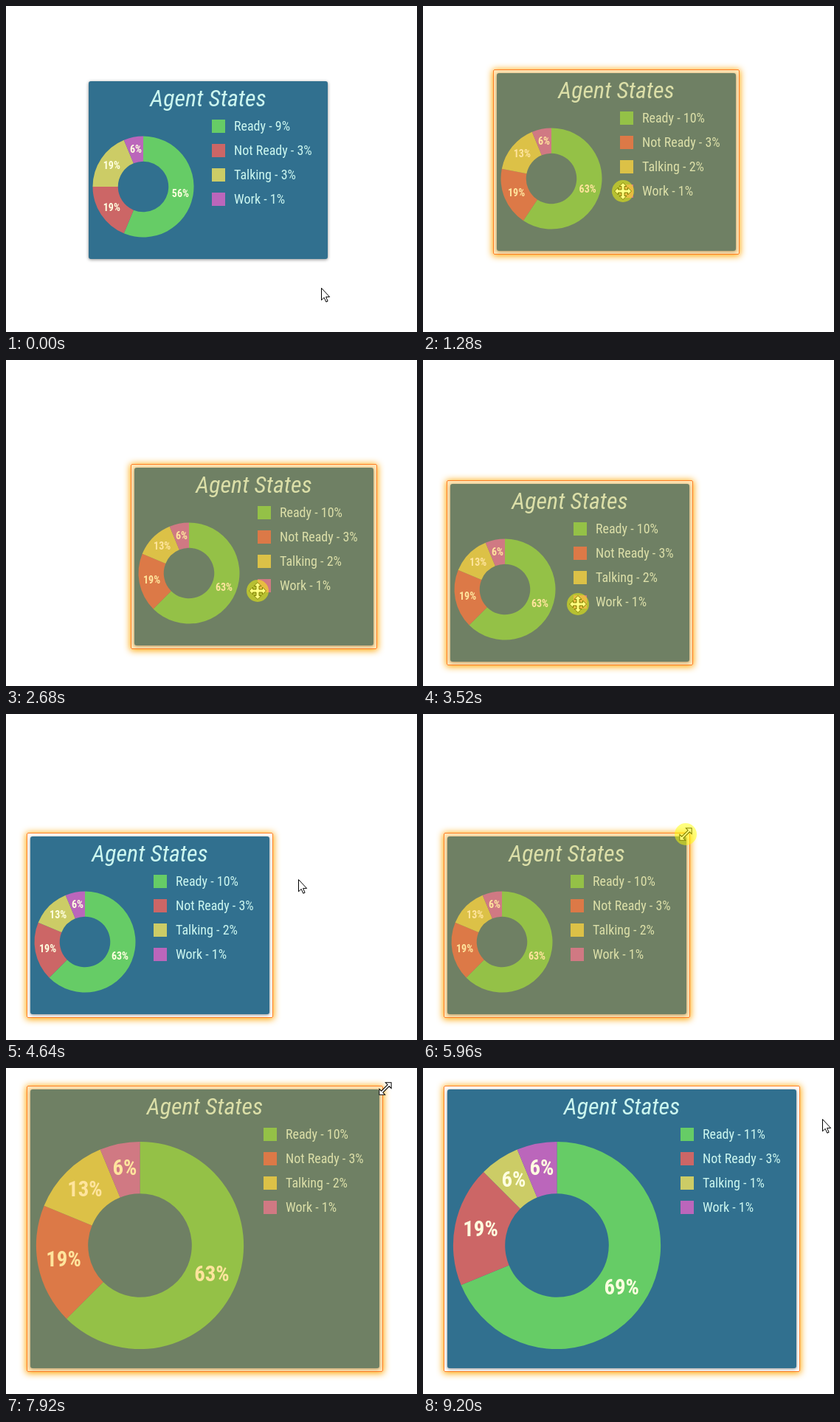
Write an HTML page that moves like this. It is 557 px wide and 442 px high and loops after 9.28 s.

```html
<!DOCTYPE html>
<html lang="en">
<head>
<meta charset="utf-8">
<title>Agent States</title>
<style>
  html, body { margin: 0; width: 100%; height: 100%; overflow: hidden; background: #fff; }
  #stage { position: relative; width: 557px; height: 442px; overflow: hidden; }
  #widget, #frame, #card, #tint, svg { position: absolute; }
  #frame {
    inset: -5px; box-sizing: border-box; border: 1px solid #ff7f27;
    border-radius: 2px; box-shadow: 0 1px 10px 1px orange;
  }
  #card { inset: 0; background: #31708f; border-radius: 3px; box-shadow: 0 1px 4px rgba(0, 0, 0, .45); }
  #tint { inset: -4px; background: rgba(255, 165, 0, .3); }
  svg { left: 0; top: 0; width: 557px; height: 442px; overflow: visible; }
  text {
    font-family: "Roboto Condensed", Roboto, sans-serif; font-stretch: condensed;
    font-size: 18px; fill: #ccf7f0;
  }
  .title { font-size: 32px; font-style: italic; text-anchor: middle; }
  .share { font-weight: 600; fill: lightyellow; text-anchor: middle; }
  #pointer path { fill: #fff; stroke: #000; stroke-width: 1; }
</style>
</head>
<body>
<div id="stage">
  <div id="widget">
    <div id="frame"></div>
    <div id="card"></div>
    <svg id="chart"></svg>
    <div id="tint"></div>
  </div>
  <svg>
    <g id="pointer">
      <path id="arrow" d="M.5 .5V16.8L4.2 13.3 6.8 19.2 9.1 18.2 6.6 12.4H11.6Z"/>
      <path id="move" d="M0-11.5L5-6.5H2V-2H6.5V-5L11.5 0 6.5 5V2H2V6.5H5L0 11.5-5 6.5H-2V2H-6.5V5L-11.5 0-6.5-5V-2H-2V-6.5H-5Z"/>
      <path id="resize" transform="rotate(-45)" d="M-11.5 0L-6-5.5V-1.5H6V-5.5L11.5 0 6 5.5V1.5H-6V5.5Z"/>
      <circle id="press" r="15" fill="#ff0" fill-opacity=".5"/>
    </g>
  </svg>
</div>
<script>
const LOOP = 9280, START = 160, TICK = 280 / 3;

const states = [
  ['Ready', '#66cc66'], ['Not Ready', '#cc6666'],
  ['Talking', '#cccc66'], ['Work', '#bb66bb']
];
const counts = [[9, 3, 3, 1], [10, 3, 2, 1], [11, 3, 1, 1]];
const updates = [8, 89], morphTicks = 8;

// Drag path of the card: tick, x, y
const drag = [
  [10, 112, 102], [15, 78, 60], [19, 109, 40], [21, 153, 31],
  [24, 206, 85], [27, 174, 146], [32, 62, 166], [40, 33, 166]
];
const grip = [174, 164], dragLag = .35;

const $ = id => document.getElementById(id);
const within = (n, a, b) => n >= a && n < b;
const show = (el, on) => { el.style.display = on ? '' : 'none'; };
const mix = (a, b, u) => a + (b - a) * u;
const progress = (n, a, b) => Math.min(1, Math.max(0, (n - a) / (b - a)));
const easeOut = u => Math.sin(u * Math.PI / 2);
const easeInOut = u => (1 - Math.cos(u * Math.PI)) / 2;
const easeCubic = u => u < .5 ? 4 * u ** 3 : 1 - 4 * (1 - u) ** 3;

function add(tag, attrs, label = '') {
  const el = document.createElementNS('http://www.w3.org/2000/svg', tag);
  for (const key in attrs) el.setAttribute(key, attrs[key]);
  el.textContent = label;
  return $('chart').appendChild(el);
}

// Smooth spline through the points, at rest at both ends
function follow(keys, n) {
  const last = keys.length - 1;
  const t = Math.min(keys[last][0], Math.max(keys[0][0], n));
  const i = Math.max(0, keys.findIndex(k => k[0] >= t) - 1);
  const a = keys[i], b = keys[i + 1], span = b[0] - a[0], u = (t - a[0]) / span;
  const slope = (j, c) => j === 0 || j === last ? 0
    : (keys[j + 1][c] - keys[j - 1][c]) / (keys[j + 1][0] - keys[j - 1][0]);
  return [1, 2].map(c => mix(a[c], b[c], u * u * (3 - 2 * u))
    + span * u * (1 - u) * ((1 - u) * slope(i, c) - u * slope(i + 1, c)));
}

function cardAt(n) {
  const [x, y] = follow(drag, n), u = progress(n, 62, 73);
  const grow = 137 * easeOut(u);
  return { x, y: y - grow, w: 324 + 149 * easeInOut(u), h: 241 + grow };
}

function glide(n, from, to, a, b) {
  const e = easeInOut(progress(n, from, to));
  return [mix(a[0], b[0], e), mix(a[1], b[1], e)];
}

function pointerAt(n) {
  const held = t => follow(drag, t).map((v, i) => v + grip[i]);
  const turn = [440, 200];
  if (n < 10) return glide(n, -1, 10, [427, 382], held(10));
  if (n < 43) return held(n + dragLag);
  if (n < 50) return glide(n, 43, 50, held(43), turn);
  if (n < 58) return glide(n, 50, 57, turn, [356, 163]);
  if (n < 81) {
    // The hand runs ahead of the corner it pulls
    const e = easeInOut(progress(n, 62, 73)), { x, y, w } = cardAt(n + e);
    return [x + w - 1 + 6 * e, y - 3 - 2 * e];
  }
  return glide(n, 81, 91, [511, 24], [541, 69]);
}

function countsAt(n) {
  const step = updates.filter(u => n >= u).length;
  const now = counts[step], from = counts[Math.max(0, step - 1)];
  const start = updates[step - 1] ?? 0;
  const e = easeCubic(progress(n, start, start + morphTicks));
  return { now, shown: now.map((v, i) => mix(from[i], v, step ? e : 1)) };
}

const title = add('text', { class: 'title' }, 'Agent States');
const rows = states.map(([name, fill]) => ({
  name,
  slice: add('path', { fill }),
  swatch: add('rect', { fill, width: 18, height: 18 }),
  label: add('text', {})
}));
rows.forEach(row => { row.share = add('text', { class: 'share' }); });

const place = (el, x, y) => {
  el.setAttribute('x', x);
  el.setAttribute('y', y);
};

function ringSlice(cx, cy, r, a, b) {
  const at = (angle, radius) =>
    `${cx + radius * Math.sin(angle)} ${cy - radius * Math.cos(angle)}`;
  const big = b - a > Math.PI ? 1 : 0, hole = r / 2;
  return `M${at(a, r)}A${r} ${r} 0 ${big} 1 ${at(b, r)}`
    + `L${at(b, hole)}A${hole} ${hole} 0 ${big} 0 ${at(a, hole)}Z`;
}

function drawChart(n, w, h) {
  const { now, shown } = countsAt(n);
  const cx = (w - 176) / 2, cy = h / 2 + 22.5, r = 68.5 + .484 * (w - 324);
  const size = r * .205;
  let angle = 0;
  place(title, w / 2, 33.5);
  rows.forEach((row, i) => {
    const end = angle + shown[i] / 16 * 2 * Math.PI, mid = (angle + end) / 2;
    row.slice.setAttribute('d', ringSlice(cx, cy, r, angle, end));
    row.share.textContent = Math.round(now[i] / 16 * 100) + '%';
    row.share.style.fontSize = size + 'px';
    place(row.share, cx + .75 * r * Math.sin(mid), cy - .75 * r * Math.cos(mid) + .29 * size);
    place(row.swatch, w - 157, 52 + 33 * i);
    row.label.textContent = `${row.name} - ${now[i]}%`;
    place(row.label, w - 127, 67 + 33 * i);
    angle = end;
  });
}

function draw(ms) {
  const n = Math.floor((ms - START) / TICK + .15);
  const card = cardAt(n);
  for (const key in card) card[key] = Math.round(card[key]);
  Object.assign($('widget').style, {
    left: card.x + 'px', top: card.y + 'px', width: card.w + 'px', height: card.h + 'px'
  });
  drawChart(n, card.w, card.h);

  const moving = within(n, 4, 48), sizing = within(n, 58, 84);
  show($('frame'), n >= 4);
  show($('tint'), moving || sizing);

  const [px, py] = pointerAt(n).map(Math.round);
  $('pointer').setAttribute('transform', `translate(${px} ${py})`);
  show($('arrow'), !moving && !sizing);
  show($('move'), moving);
  show($('resize'), sizing);
  show($('press'), within(n, 10, 41) || within(n, 62, 79));
}

const began = performance.now();
function loop() {
  draw((performance.now() - began) % LOOP);
  requestAnimationFrame(loop);
}
loop();
</script>
</body>
</html>
```
